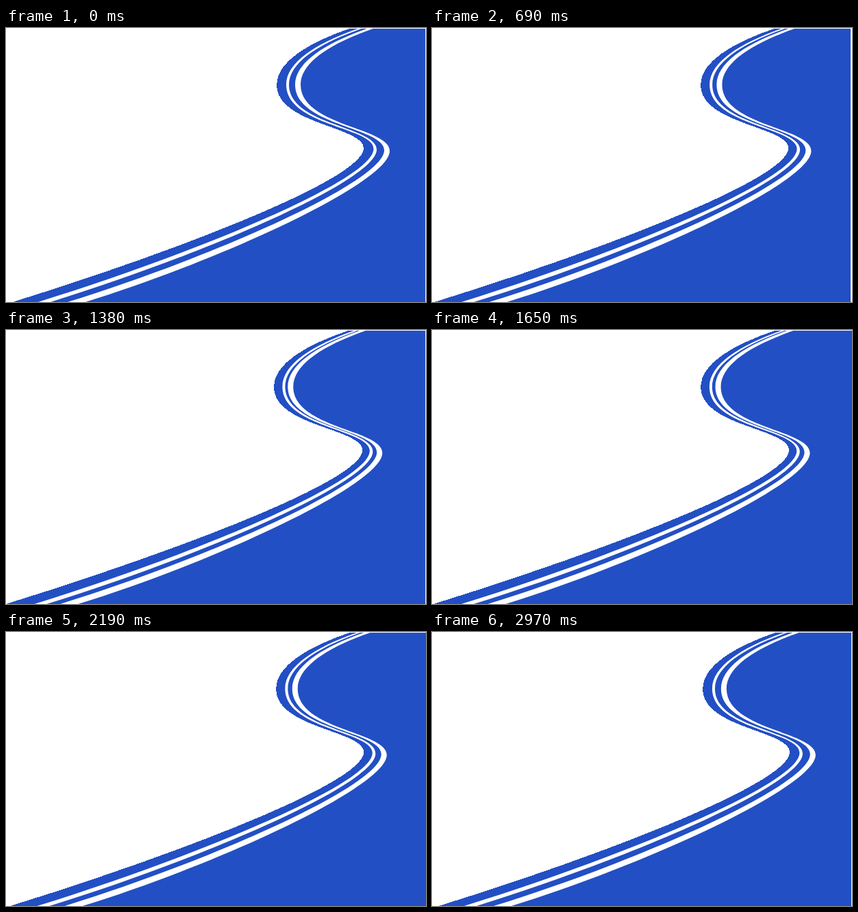
These frames come from a looping animation (613 by 401 pixels, 3000 ms). An HTML page:

```html
<!DOCTYPE html>
<html lang="en">
<head>
<meta charset="utf-8">
<title>Winding road</title>
<style>
html, body { margin: 0; width: 100%; height: 100%; overflow: hidden; background: #fff; }
svg { display: block; }
</style>
</head>
<body>
<svg width="613" height="401" viewBox="0 0 613 401">
  <path id="land" fill="#234fc4" shape-rendering="crispEdges"/>
  <path id="thin" fill="#fff"/>
  <path id="thick" fill="#fff"/>
</svg>
<script>
const LOOP = 3000, STEP = 30, TURN = 1335;
const TOP = 0.6, BOTTOM = 401, LEFT_Y = 83;
const get = id => document.getElementById(id);
const land = get('land'), thin = get('thin'), thick = get('thick');

// Winding line as Bezier points, from the bottom edge to the top edge:
// x at the bottom, right bend, left bend and top; y of the right bend and its two handles.
function bend([bottom, right, left, top], [y, h1, h2]) {
  const reach = 0.447 * (right - bottom);
  return [
    [bottom, BOTTOM], [bottom + reach, BOTTOM - reach * 0.31],
    [right, y + 46], [right, y], [right, h1],
    [left, h2], [left, LEFT_Y], [left, 50],
    [left + (top - left) * 0.42, 22], [top, TOP]
  ];
}

const trace = points => points[0] + 'C' + points.slice(1).join(' ');

function band(outer, inner) {
  return 'M' + trace(outer) + 'L' + trace(inner.reverse()) + 'Z';
}

const shift = (xs, dx) => xs.map(x => x + dx);

function draw(t) {
  const sway = t < TURN ? t / TURN : (LOOP - t) / (LOOP - TURN);
  const drift = -Math.sin(2 * Math.PI * t / LOOP);

  const edge = [10 - 10 * sway, 522 - 1.5 * sway, 395 - 4 * sway, 502 - 1.5 * sway];
  const side = 612.35 + drift;
  land.setAttribute('d', 'M' + trace(bend(shift(edge, drift), [176, 144, 141])) +
    `L${side} ${TOP}V${BOTTOM}Z`);

  const thinX = drift - 5.5 * sway;
  thin.setAttribute('d', band(
    bend(shift([47, 536.5, 409, 515], thinX), [177, 145, 143]),
    bend(shift([65, 541, 413, 520], thinX), [178, 144, 142])));

  const thickX = drift - 10.8 * sway;
  thick.setAttribute('d', band(
    bend(shift([90, 552, 422, 528], thickX), [179, 145, 143]),
    bend(shift([116, 560, 430, 537], thickX), [180, 145.5, 143.5])));
}

function tick() {
  const t = performance.now() % LOOP;
  draw(Math.floor(t / STEP) * STEP);
  requestAnimationFrame(tick);
}
tick();
</script>
</body>
</html>
```
